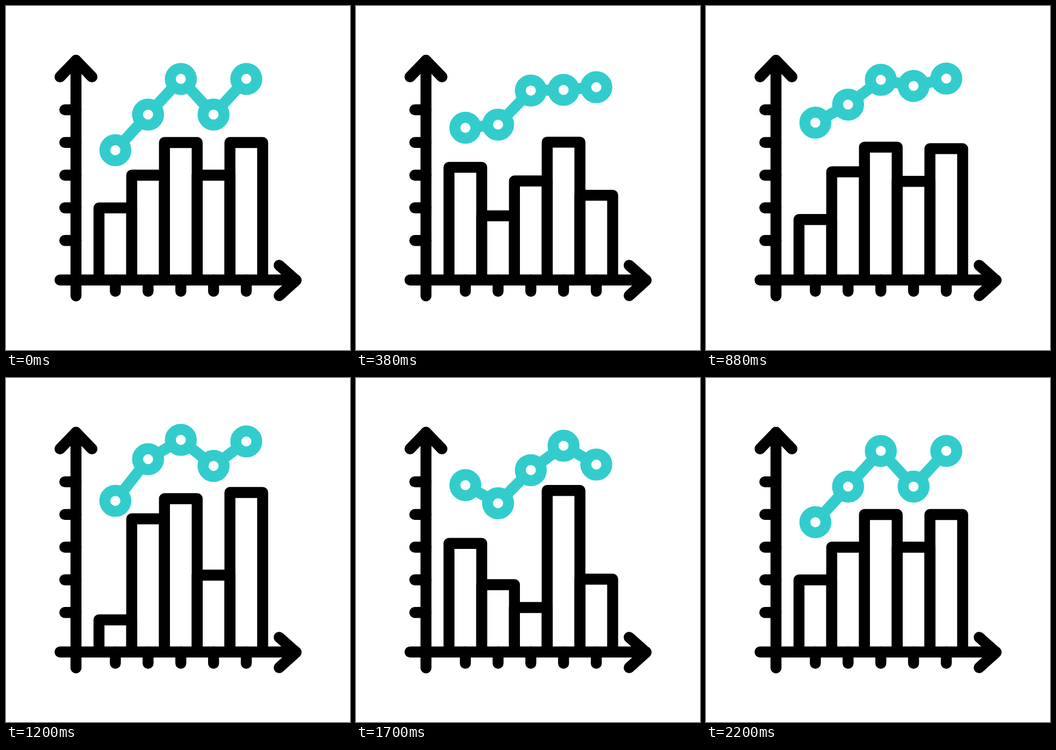
An HTML page with a canvas that plays this animation: 640 px wide and 640 px high, repeating every 2.6 s.

```html
<!DOCTYPE html>
<html lang="en">
<head>
<meta charset="utf-8">
<title>Growth chart</title>
<style>
html, body { margin: 0; width: 100%; height: 100%; overflow: hidden; background: #fff; }
canvas { display: block; width: 100vmin; height: 100vmin; margin: auto; }
</style>
</head>
<body>
<canvas id="stage"></canvas>
<script>
const SIZE = 640, LOOP = 2600, STEP = 20, START = 200, LEG = 500;
const LINE = 20.4, COL = 60.9, ROW = 60.8, BASE = 509.8;
const BLACK = '#000', TEAL = '#33cccc';

// At rest, bars and dots share the same zigzag of levels.
const restAt = (top, rise) => [2, 1, 0, 1, 0].map(n => top + rise * n);
const barRest = restAt(254, ROW);
const dotRest = restAt(135.7, 66.3);

const bars = [
  barRest,
  [269, 421.5, 355, 228, 392.5],
  [450, 262, 224.5, 366.8, 213],
  [307.7, 384.5, 427, 209.3, 374.3]
];
// The dots swing through the same bent pose on either side of the peak.
const bent = [199.3, 233, 171.4, 126, 161];
const peak = [228.6, 151, 115.1, 163.6, 118];
const dots = [dotRest, bent, peak, bent];

const canvas = document.getElementById('stage');
const ctx = canvas.getContext('2d');
const scale = window.devicePixelRatio || 1;
canvas.width = canvas.height = SIZE * scale;

// Near-linear start with a soft landing; a smaller pull lands sooner.
function softLanding(pull) {
  const at = (a, b, s) => 3 * (1 - s) * (1 - s) * s * a + 3 * (1 - s) * s * s * b + s * s * s;
  return x => {
    let lo = 0, hi = 1;
    for (let i = 0; i < 30; i++) {
      const mid = (lo + hi) / 2;
      if (at(1 / 6, pull, mid) < x) lo = mid; else hi = mid;
    }
    return at(1 / 6, 1, lo);
  };
}
const barEase = softLanding(0.2);
const dotEase = softLanding(0.383);

function pose(keys, ease, t) {
  const p = Math.min(keys.length, Math.max(0, (t - START) / LEG));
  const leg = Math.floor(p) % keys.length;
  const next = keys[(leg + 1) % keys.length];
  const k = ease(p % 1);
  return keys[leg].map((v, i) => v + (next[i] - v) * k);
}

function line(...pts) {
  ctx.beginPath();
  pts.forEach(([x, y]) => ctx.lineTo(x, y));
  ctx.stroke();
}

const barX = i => 173 + COL * i;
const midX = i => barX(i + 0.5);

function drawAxes() {
  line([130.2, 101], [130.2, 539.4]);
  line([100.5, 131.9], [130.2, 101], [159.9, 131.9]);
  line([100.5, BASE], [539.5, BASE]);
  line([508.2, 482.4], [539.7, 510.4], [508.2, 538.9]);
  for (let i = 0; i < 5; i++) {
    const y = 193.1 + ROW * i;
    line([109.4, y], [130.2, y]);
    line([midX(i), BASE], [midX(i), 530.8]);
  }
}

function drawBars(tops) {
  tops.forEach((y, i) =>
    line([barX(i), BASE], [barX(i), y], [barX(i + 1), y], [barX(i + 1), BASE]));
}

function drawDots(ys) {
  line(...ys.map((y, i) => [midX(i), y]));
  ys.forEach((y, i) => {
    ctx.beginPath();
    ctx.arc(midX(i), y, 19.55, 0, Math.PI * 2);
    ctx.fill();
    ctx.stroke();
  });
}

function draw(t) {
  ctx.setTransform(scale, 0, 0, scale, 0, 0);
  ctx.fillStyle = '#fff';
  ctx.fillRect(0, 0, SIZE, SIZE);
  ctx.lineWidth = LINE;
  ctx.lineJoin = 'round';

  ctx.strokeStyle = BLACK;
  ctx.lineCap = 'round';
  drawAxes();
  ctx.lineCap = 'butt';
  drawBars(pose(bars, barEase, t));

  ctx.strokeStyle = TEAL;
  drawDots(pose(dots, dotEase, t));
}

const origin = performance.now();
function tick() {
  const t = (performance.now() - origin) % LOOP;
  draw(Math.floor(t / STEP) * STEP);
  requestAnimationFrame(tick);
}
tick();
</script>
</body>
</html>
```
